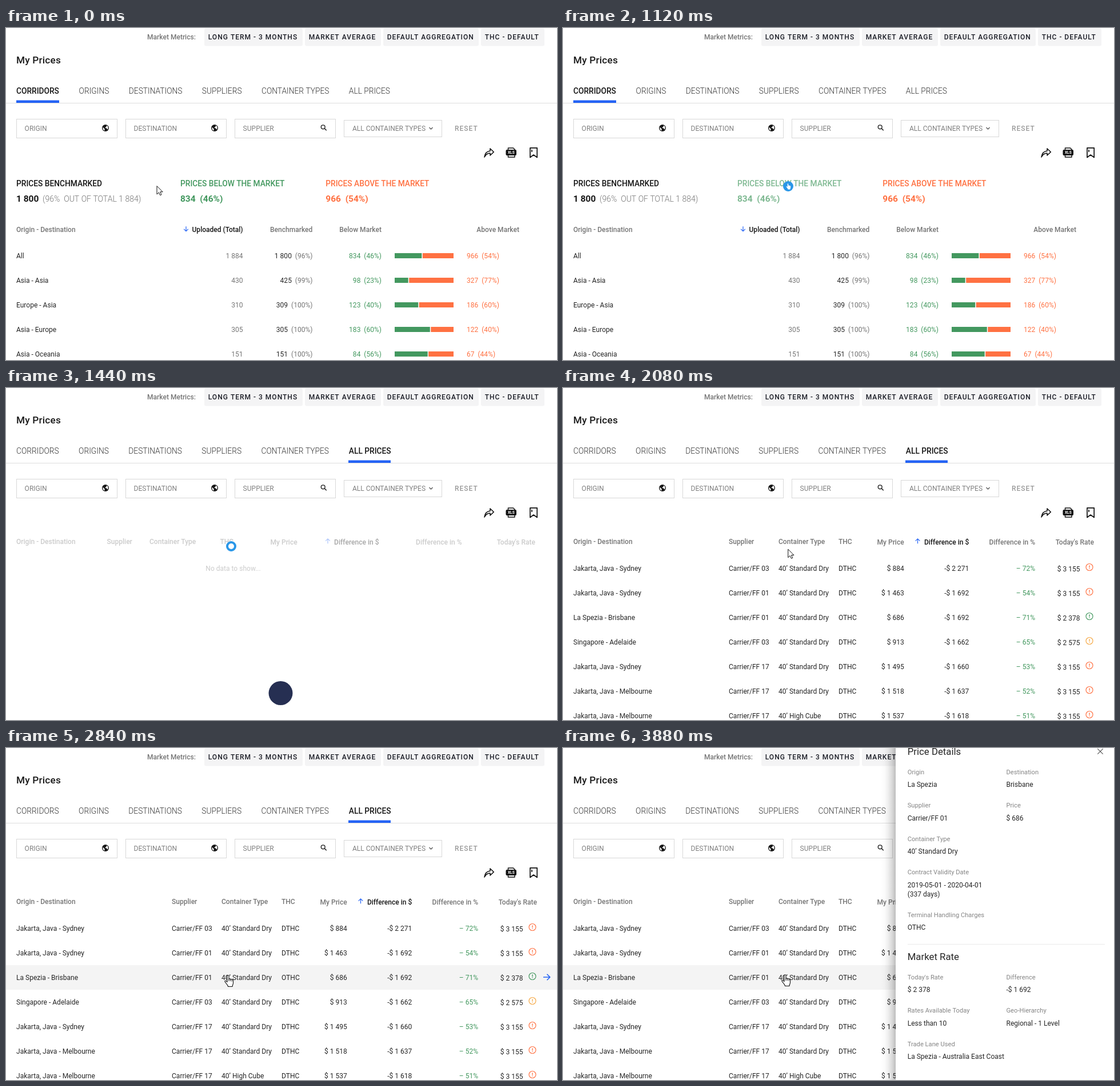
Animation, 964 px wide and 581 px high, one loop 4.72 s. Source, as an HTML page with a canvas:

```html
<!DOCTYPE html>
<html lang="en">
<head>
<meta charset="utf-8">
<title>My Prices</title>
<style>
  html, body { margin: 0; width: 100%; height: 100%; overflow: hidden; background: #fff; }
  canvas { display: block; width: 964px; height: 581px; }
</style>
</head>
<body>
<canvas id="stage"></canvas>
<script>
const W = 964, H = 581, LOOP = 4720, STEP = 40;
const canvas = document.getElementById('stage');
const ctx = canvas.getContext('2d');
const dpr = window.devicePixelRatio || 1;
canvas.width = W * dpr;
canvas.height = H * dpr;

const INK = '#262626', GREY = '#757575', BLUE = '#2463f5';
const GREEN = '#43985f', ORANGE = '#ff7142', AMBER = '#f5a742';

// [weight, size, letter spacing]
const STYLE = {
  title: [500, 17.2, 0.2], tab: [300, 13.76, 0], tabOn: [500, 13.76, 0],
  chip: [500, 12.04, 1], head: [500, 12.04, 0], body: [400, 12.04, 0],
  reset: [500, 12.04, 1], card: [500, 13.76, 0], big: [700, 15.48, 0],
  note: [300, 14, 0], section: [400, 16.8, 0], label: [400, 11.18, 0],
  tiny: [700, 6.5, 0]
};

// y is the middle of the capitals
function text(s, x, y, style, color = INK, align = 'left') {
  const [weight, size, gap] = STYLE[style];
  ctx.font = `${weight} ${size}px Roboto, sans-serif`;
  ctx.letterSpacing = gap + 'px';
  ctx.textAlign = align;
  ctx.fillStyle = color;
  ctx.fillText(s, x, y + size * 0.355);
  return ctx.measureText(s).width;
}

function rect(x, y, w, h, color) {
  ctx.fillStyle = color;
  ctx.fillRect(x, y, w, h);
}

function disc(x, y, r, color) {
  ctx.fillStyle = color;
  ctx.beginPath();
  ctx.arc(x, y, r, 0, 7);
  ctx.fill();
}

function ring(x, y, r, color, width) {
  ctx.strokeStyle = color;
  ctx.lineWidth = width;
  ctx.beginPath();
  ctx.arc(x, y, r, 0, 7);
  ctx.stroke();
}

function shape(d, x, y, { fill, stroke, width = 1, scale = 1 }) {
  const path = new Path2D(d);
  ctx.save();
  ctx.translate(x, y);
  ctx.scale(scale, scale);
  ctx.lineJoin = 'round';
  ctx.lineWidth = width;
  if (fill) { ctx.fillStyle = fill; ctx.fill(path); }
  if (stroke) { ctx.strokeStyle = stroke; ctx.stroke(path); }
  ctx.restore();
}

const ARROW = 'M0 0V14.5L3.4 11.3 5.7 16.2 8 15.2 5.8 10.3H10.2Z';
const HAND = 'M-1.5 1.8a1.5 1.5 0 0 1 3 0V7.2a1.4 1.4 0 0 1 2.7.5a1.4 1.4 0 0 1 2.6.6' +
  'a1.3 1.3 0 0 1 2.2 1V14c0 2.3-1.5 3.3-1.5 6H0c0-1.7-1.5-3-2.5-4.5L-5.4 11.6' +
  'c-.8-1.5.9-2.5 2-1.400L-1.5 12Z';

function arrowCursor(x, y) {
  shape(ARROW, x, y, { fill: '#fff', stroke: '#111' });
}

function handCursor(x, y) {
  shape(HAND, x, y + 0.5, { fill: '#fff', stroke: '#111', width: 1.1 });
  shape('M1.500 7V10.500M4.200 8V10.500M6.700 9V11', x, y + 0.5, { stroke: '#111' });
}

function globe(x, y) {
  disc(x, y, 6, '#161616');
  shape('M-4.500-1.500L-1.500 1.500V4.600C-3.700 4-5 2-4.500-1.500ZM-.5-4.700L2-4.300 1.500-2-1-.8 2.300.8 3.800 2.700C5.500 0 4.500-3 2.800-4Z',
    x, y, { fill: '#fff' });
}

// dir: 1 points down, -1 points up
function sortArrow(x, y, dir) {
  shape(`M0 ${-4.2 * dir}V${4 * dir}M-3.800 ${0.4 * dir}L0 ${4.2 * dir} 3.800 ${0.4 * dir}`,
    x, y, { stroke: BLUE, width: 1.2 });
}

function actions() {
  shape('M-8 8C-7 1-3-2.500 2-2.800V-7L8.300-1 2 4.800V1C-2.500 1-5.500 3-8 8Z',
    845, 218, { stroke: '#111', width: 1.6 });
  shape('M-5.500-4V-8H3.500L6-5.500V-4M-5.500 4.500V8H6V4.500', 884, 218, { stroke: '#111', width: 1.500 });
  ctx.fillStyle = '#111';
  ctx.beginPath();
  ctx.roundRect(874.5, 213, 18.5, 10, 2);
  ctx.fill();
  text('XLS', 883.8, 218, 'tiny', '#fff', 'center');
  shape('M-6-8.200H6.200V8.500L0 4-6 8.500ZM-3-5V-1', 923, 218, { stroke: '#111', width: 1.700 });
}

const CHIPS = [
  ['LONG TERM - 3 MONTHS', 347, 172], ['MARKET AVERAGE', 523, 133],
  ['DEFAULT AGGREGATION', 660, 167], ['THC - DEFAULT', 831, 111]
];
const TABS = [
  ['CORRIDORS', 18], ['ORIGINS', 127.6], ['DESTINATIONS', 214.8],
  ['SUPPLIERS', 342.8], ['CONTAINER TYPES', 447], ['ALL PRICES', 599.8]
];

function frameUI(allPrices) {
  text('Market Metrics:', 247, 16, 'head', GREY);
  for (const [name, x, w] of CHIPS) {
    ctx.fillStyle = '#f4f4f5';
    ctx.beginPath();
    ctx.roundRect(x, 1, w, 30.5, 3);
    ctx.fill();
    text(name, x + 6.7, 16, 'chip', '#1b1d26');
  }
  text('My Prices', 18, 55.5, 'title', '#1a1a1a');

  rect(0, 131, W, 1, '#dedede');
  const active = allPrices ? 5 : 0;
  TABS.forEach(([name, x], i) => {
    const shift = allPrices && i > 0 && i < 5 ? -0.5 : 0;
    const on = i === active;
    text(name, x + shift, 110, on ? 'tabOn' : 'tab', on ? '#161616' : '#333');
  });
  rect(allPrices ? 599 : 18, 126.5, allPrices ? 74 : 75, 4.5, BLUE);

  ctx.strokeStyle = '#d8d8d8';
  ctx.lineWidth = 1;
  ['ORIGIN', 'DESTINATION', 'SUPPLIER'].forEach((name, i) => {
    const x = 18 + i * 191;
    ctx.strokeRect(x + 0.5, 159.5, 176, 33);
    text(name, x + 14.6, 176, 'body', '#808080');
  });
  ctx.strokeRect(591.5, 161.5, 171, 29);
  text('ALL CONTAINER TYPES', 606, 176, 'body', '#808080');
  text('RESET', 785, 176, 'reset', '#9a9a9a');
  globe(174, 175);
  globe(365, 175);
  ring(554.7, 173.3, 3.4, '#222', 1.4);
  shape('M2.500 2.500L6 6', 554.7, 173.3, { stroke: '#222', width: 1.600 });
  shape('M-3-1.500L0 1.500 3-1.500', 743.5, 175.5, { stroke: '#555', width: 1.300 });
  actions();
}

// name, uploaded, benchmarked, share, below, below %, above
const CORRIDORS = [
  ['All', '1 884', '1 800', 96, 834, 46, 966],
  ['Asia - Asia', '430', '425', 99, 98, 23, 327],
  ['Europe - Asia', '310', '309', 100, 123, 40, 186],
  ['Asia - Europe', '305', '305', 100, 183, 60, 122],
  ['Asia - Oceania', '151', '151', 100, 84, 56, 67]
];

function corridors(fade) {
  text('PRICES BENCHMARKED', 18, 272.5, 'card', '#161616');
  text('1 800', 18, 299, 'big', '#161616');
  text('(96%  OUT OF TOTAL 1 884)', 64, 299.5, 'note', GREY);
  ctx.globalAlpha = 1 - 0.32 * fade;
  text('PRICES BELOW THE MARKET', 305, 272.5, 'card', GREEN);
  text('834  (46%)', 305, 299, 'big', GREEN);
  ctx.globalAlpha = 1;
  text('PRICES ABOVE THE MARKET', 559.3, 272.5, 'card', ORANGE);
  text('966  (54%)', 559.3, 299, 'big', ORANGE);

  text('Origin - Destination', 18, 352.5, 'head', GREY);
  sortArrow(315, 351.5, 1);
  text('Uploaded (Total)', 414.6, 353, 'head', '#161616', 'right');
  text('Benchmarked', 536.3, 353, 'head', GREY, 'right');
  text('Below Market', 657, 353, 'head', GREY, 'right');
  text('Above Market', 898, 353, 'head', GREY, 'right');

  CORRIDORS.forEach(([name, total, bench, share, below, part, above], i) => {
    const y = 398.8 + i * 43;
    text(name, 18, y, 'body');
    text(total, 414.6, y, 'body', GREY, 'right');
    const w = text(`  (${share}%)`, 536.5, y, 'body', GREY, 'right');
    text(bench, 536.5 - w, y, 'body', INK, 'right');
    text(`${below}  (${part}%)`, 657, y, 'body', GREEN, 'right');
    const split = 680 + 1.03 * part;
    rect(680, y - 4.8, split - 680, 9, GREEN);
    rect(split + 1.5, y - 4.8, 783 - split - 1.5, 9, ORANGE);
    text(`${above}  (${100 - part}%)`, 806, y, 'body', ORANGE);
  });
}

function priceHeader(lefts, rights, arrowX) {
  ['Origin - Destination', 'Supplier', 'Container Type', 'THC']
    .forEach((s, i) => text(s, lefts[i], 269, 'head', GREY));
  ['My Price', 'Difference in $', 'Difference in %', "Today's Rate"]
    .forEach((s, i) => text(s, rights[i], 269.7, 'head', i === 1 ? '#161616' : GREY, 'right'));
  sortArrow(arrowX, 268, -1);
}

function loading() {
  ctx.globalAlpha = 0.38;
  priceHeader([18, 176.5, 251, 374.5], [509.7, 652.5, 797.5, 926], 563);
  text('No data to show...', 397.5, 315.5, 'body', GREY, 'center');
  ctx.globalAlpha = 1;
  disc(480.5, 534, 21, '#262f52');
}

// route, carrier, THC, price, difference, percent, rate, colour
const PRICES = [
  ['Jakarta, Java - Sydney', '03', 'D', '884', '2 271', 72, '3 155', ORANGE],
  ['Jakarta, Java - Sydney', '01', 'D', '1 463', '1 692', 54, '3 155', ORANGE],
  ['La Spezia - Brisbane', '01', 'O', '686', '1 692', 71, '2 378', GREEN],
  ['Singapore - Adelaide', '03', 'D', '913', '1 662', 65, '2 575', AMBER],
  ['Jakarta, Java - Sydney', '17', 'D', '1 495', '1 660', 53, '3 155', ORANGE],
  ['Jakarta, Java - Melbourne', '17', 'D', '1 518', '1 637', 52, '3 155', ORANGE],
  ['Jakarta, Java - Melbourne', '17', 'D', '1 537', '1 618', 51, '3 155', ORANGE]
];

function prices(hover) {
  priceHeader([18, 290, 377, 482], [596.7, 710.3, 826, 929], 620.5);
  PRICES.forEach(([route, carrier, thc, price, diff, pct, rate, color], i) => {
    const y = 315.5 + i * 43;
    if (i === hover) {
      rect(0, 294 + i * 43, W, 43, '#f4f4f4');
      shape('M-6 0H5.500M.5-5.300L5.800 0 .5 5.300', 946, y - 0.5 - 1.5 + 1.5, { stroke: BLUE, width: 1.600 });
    }
    text(route, 18, y, 'body');
    text('Carrier/FF ' + carrier, 290, y, 'body');
    text(i === 6 ? '40’ High Cube' : '40’ Standard Dry', 377, y, 'body');
    text(thc + 'THC', 482, y, 'body');
    text('$ ' + price, 596.7, y, 'body', INK, 'right');
    text('-$ ' + diff, 710.3, y, 'body', INK, 'right');
    text(`– ${pct}%`, 826, y, 'body', GREEN, 'right');
    text('$ ' + rate, 904.5, y + 1.3, 'body', INK, 'right');
    ring(921, y - 2, 6, color, 1.2);
    rect(920.4, y - 5.2, 1.3, 4, color);
    rect(920.4, y - 0.2, 1.3, 1.3, color);
  });
}

const DETAILS = [
  ['Origin', 'La Spezia', 0, 42], ['Destination', 'Brisbane', 1, 42],
  ['Supplier', 'Carrier/FF 01', 0, 100.5], ['Price', '$ 686', 1, 100.5],
  ['Container Type', '40’ Standard Dry', 0, 159],
  ['Contract Validity Date', '2019-05-01 - 2020-04-01', 0, 217.5],
  ['Terminal Handling Charges', 'OTHC', 0, 291.8],
  ["Today's Rate", '$ 2 378', 0, 401], ['Difference', '-$ 1 692', 1, 401],
  ['Rates Available Today', 'Less than 10', 0, 459.5],
  ['Geo-Hierarchy', 'Regional - 1 Level', 1, 459.5],
  ['Trade Lane Used', 'La Spezia - Australia East Coast', 0, 518]
];

function panel() {
  const shade = ctx.createLinearGradient(556, 0, 582, 0);
  for (let i = 0; i <= 4; i++) shade.addColorStop(i / 4, `rgba(0,0,0,${0.26 * (i / 4) ** 2})`);
  rect(556, 0, 26, H, shade);
  rect(582, 0, 382, H, '#fff');
  text('Price Details', 602.7, 6.5, 'section');
  text('Market Rate', 602.7, 365.5, 'section');
  shape('M-4.700-4.700L4.700 4.700M4.700-4.700L-4.700 4.700', 940, 6, { stroke: '#555', width: 1.200 });
  rect(603, 343, 345, 1, '#ebebeb');
  for (const [label, value, col, y] of DETAILS) {
    const x = col ? 775.5 : 602.7;
    text(label, x, y, 'label', '#858585');
    text(value, x, y + 22, 'body');
  }
  text('(337 days)', 602.7, 255.5, 'body');
}

const smooth = u => u * u * (3 - 2 * u);
const clamp = u => Math.max(0, Math.min(1, u));

function descent(t) {
  const u = clamp((t - 2040) / 520);
  const p = (u + smooth(u)) / 2;
  return [394 - 5 * p, 277 + 110 * p];
}

function cursor(t) {
  if (t < 640) {
    const p = smooth(clamp((t - 120) / 360));
    const x = 264 + 127 * p;
    if (x < 305) arrowCursor(x, 276.5 - 9 * p);
    else handCursor(x, 276.5 - 9 * p);
  } else if (t < 1160) {
    disc(394, 277, t < 720 ? 7 : 9, '#2a97e8');
    shape(HAND, 393.5, 272, { fill: '#fff', scale: 0.52 });
  } else if (t < 1640) {
    disc(394, 277, 9, '#fff');
    ring(394, 277, 7, '#2a97e8', 4);
  } else if (t < 2640) {
    const [x, y] = descent(t);
    (y < 294 ? arrowCursor : handCursor)(x, y);
  } else if (t < 2680) handCursor(385, 389);
  else if (t < 2720) handCursor(383, 393);
  else if (t < 2840) handCursor(384, 396);
  else handCursor(388.5, t < 3880 ? 397 : 396);
}

function draw(now) {
  const t = Math.floor((now % LOOP) / STEP) * STEP;
  ctx.setTransform(dpr, 0, 0, dpr, 0, 0);
  rect(0, 0, W, H, '#fff');
  frameUI(t >= 1160);
  if (t < 1160) corridors(clamp((t - 240) / 240));
  else if (t < 1640) loading();
  else prices(Math.floor((descent(t - STEP)[1] - (t < 2560 ? 294 : 293)) / 43));
  if (t >= 3280) panel();
  cursor(t);
}

let start;
function tick(now) {
  if (start === undefined) start = now;
  draw(now - start);
  requestAnimationFrame(tick);
}
draw(0);
requestAnimationFrame(tick);
</script>
</body>
</html>
```
